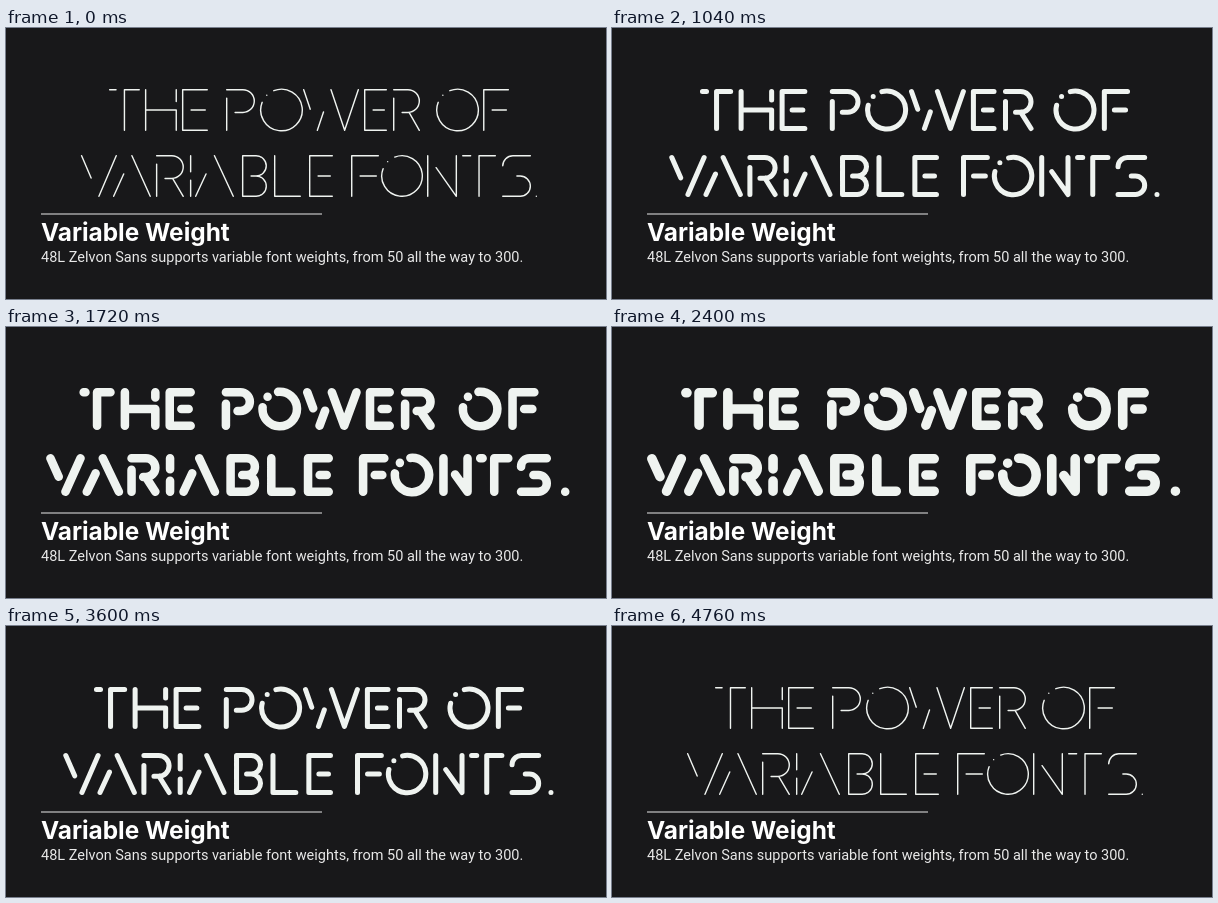
Recreate the animation shown at these times as an HTML page. Size 600 px wide and 271 px high, loop 4800 ms.

```html
<!DOCTYPE html>
<html lang="en">
<head>
<meta charset="utf-8">
<title>Variable Weight</title>
<style>
  html, body { margin: 0; width: 100%; height: 100%; overflow: hidden; background: #18181a; }
  svg { display: block; width: 600px; height: 271px; font-optical-sizing: none; }
  #word { fill: none; stroke: #eff3f0; stroke-linecap: round; stroke-linejoin: round; }
  .head { font: 700 24.4px Inter, sans-serif; fill: #fff; }
  .note { font: 400 14.5px Roboto, sans-serif; fill: #e8e8e8; }
</style>
</head>
<body>
<svg viewBox="0 0 600 271">
  <path id="word"/>
  <path d="M35 186H316" stroke="#e8e8e8"/>
  <text class="head" x="35" y="213">Variable Weight</text>
  <text class="note" x="35" y="234">48L Zelvon Sans supports variable font weights, from 50 all the way to 300.</text>
</svg>
<script>
const LOOP = 4800, STEP = 40, LEAD = 80;
const THIN = 1.4, BOLD = 9.6;
const word = document.getElementById('word');

// letter, then left and right edge at the lightest and at the boldest weight
const lines = [
  { top: 61, bottom: 103, row: [
    ['T', 103, 134, 69, 105], ['H', 139, 171, 111, 151], ['E', 176, 202, 157, 187],
    ['P', 220, 249, 215, 248], ['O', 254, 297, 252, 295], ['W', 297, 353, 297, 355],
    ['E', 358, 381, 360, 389], ['R', 387, 414, 396, 431],
    ['O', 430, 473, 456, 499], ['F', 477, 503, 506, 537]] },
  { top: 127, bottom: 169, row: [
    ['V', 75, 111, 35, 74], ['A', 107, 145, 72, 113], ['R', 150, 178, 117, 150],
    ['I', 184, 185.4, 156, 166], ['A', 189, 228, 171, 211], ['B', 236, 261, 218, 252],
    ['L', 268, 295, 260, 289], ['E', 303, 327, 297, 327],
    ['F', 345, 373, 354, 384], ['O', 375, 417, 386, 429], ['N', 421, 451, 435, 468],
    ['T', 456, 490, 472, 509], ['S', 496, 525, 513, 548], ['.', 529.5, 531, 558, 569]] }
];

const mix = (a, b, k) => a + (b - a) * k;
const seg = (x1, y1, x2, y2, k = 1) => `M${x1} ${y1}L${mix(x1, x2, k)} ${mix(y1, y2, k)}`;
const arc = (r, sweep, x, y) => `A${r} ${r} 0 0 ${sweep} ${x} ${y}`;

// l r t b: stroke centre box, c m: its middle, d: distance between parted stroke ends
const glyphs = {
  T: ({ l, r, t, b, c, d }) => `M${l} ${t}H${Math.max(l + .1, c - d)}M${r} ${t}H${c}V${b}`,
  H: ({ l, r, t, b, m, d }) => `M${l} ${t}V${b}M${l} ${m}H${r}V${b}M${r} ${t}V${Math.max(t + .1, m - d)}`,
  E: g => `M${g.r} ${g.t}H${g.l}V${g.b}H${g.r}` + midBar(g),
  F: g => `M${g.r} ${g.t}H${g.l}V${g.b}` + midBar(g),
  L: ({ l, r, t, b }) => `M${l} ${t}V${b}H${r}`,
  P: bowl,
  R: g => bowl(g) + seg(mix(g.c, g.r, .2), mix(g.t, g.b, .56), g.r, g.b),
  B({ l, r, t, b, m, d }) {
    const q = (m - t) / 2, x = r - q;
    return `M${Math.min(l + d, x)} ${m}H${x}${arc(q, 0, x, t)}H${l}V${b}H${x}${arc(q, 0, x, m)}`;
  },
  O({ l, r, c, m, d }) {
    const q = (r - l) / 2, gap = 2 * Math.asin(d / 2 / q), mid = -Math.PI * .75;
    const at = a => `${c + q * Math.cos(a)} ${m + q * Math.sin(a)}`;
    return `M${at(mid)}h.01M${at(mid + gap)}A${q} ${q} 0 1 1 ${at(mid - gap)}`;
  },
  V: ({ l, r, t, b, c }) => seg(l, t, c, b, .55) + seg(c, b, r, t),
  A: ({ l, r, t, b, c }) => seg(l, b, c, t, .55) + seg(c, t, r, b),
  W({ l, r, t, b, c }) {
    const x1 = mix(l, r, .25), x3 = mix(l, r, .75);
    return seg(l, t, x1, b, .48) + seg(x1, b, c, t, .45) + seg(c, t, x3, b) + `L${r} ${t}`;
  },
  I: ({ c, t, b, m, d }) => `M${c} ${t}V${m - d / 2}M${c} ${m + d / 2}V${b}`,
  N: ({ l, r, t, b, d }) => `M${l} ${t}V${b}M${l + d} ${mix(t, b, d / (r - l))}L${r} ${b}V${t}`,
  S({ l, r, t, b, m }) {
    const q = (m - t) / 2;
    return `M${r} ${t}H${l + q}${arc(q, 0, l, t + q)}` +
      `M${l + q + 4} ${m}H${r - q}${arc(q, 1, r - q, b)}H${l}`;
  },
  '.': ({ c, b }) => `M${c} ${b}h.01`
};

function midBar({ l, r, m, d }) {
  const end = r - 2;
  return `M${Math.min(l + d, end - .1)} ${m}H${end}`;
}

function bowl({ l, r, t, b, d }) {
  const y = mix(t, b, .56), q = (y - t) / 2, x = r - q;
  return `M${l} ${t + d}V${b}M${l} ${t}H${x}${arc(q, 1, x, y)}H${Math.min(l + d, x)}`;
}

// ease-in-out, cubic-bezier(.42, 0, .58, 1)
function ease(x) {
  let lo = 0, hi = 1;
  for (let i = 0; i < 24; i++) {
    const u = (lo + hi) / 2, v = 1 - u;
    if (1.26 * v * v * u + 1.74 * v * u * u + u * u * u < x) lo = u; else hi = u;
  }
  return lo * lo * (3 - 2 * lo);
}

function weightAt(time) {
  const p = (Math.floor(time / STEP) * STEP + LEAD) % LOOP / (LOOP / 2);
  return ease(p < 1 ? p : 2 - p);
}

function draw(time) {
  const k = weightAt(time), s = mix(THIN, BOLD, k), h = s / 2;
  const d = s + mix(7, 2.5, k);
  let path = '';
  for (const { top, bottom, row } of lines) {
    const t = top + h, b = bottom - h;
    for (const [ch, l0, r0, l1, r1] of row) {
      const l = mix(l0, l1, k) + h, r = mix(r0, r1, k) - h;
      path += glyphs[ch]({ l, r, t, b, d, c: (l + r) / 2, m: (t + b) / 2 });
    }
  }
  word.setAttribute('d', path);
  word.setAttribute('stroke-width', s);
}

const start = performance.now();
function tick() {
  draw((performance.now() - start) % LOOP);
  requestAnimationFrame(tick);
}
tick();
</script>
</body>
</html>
```
